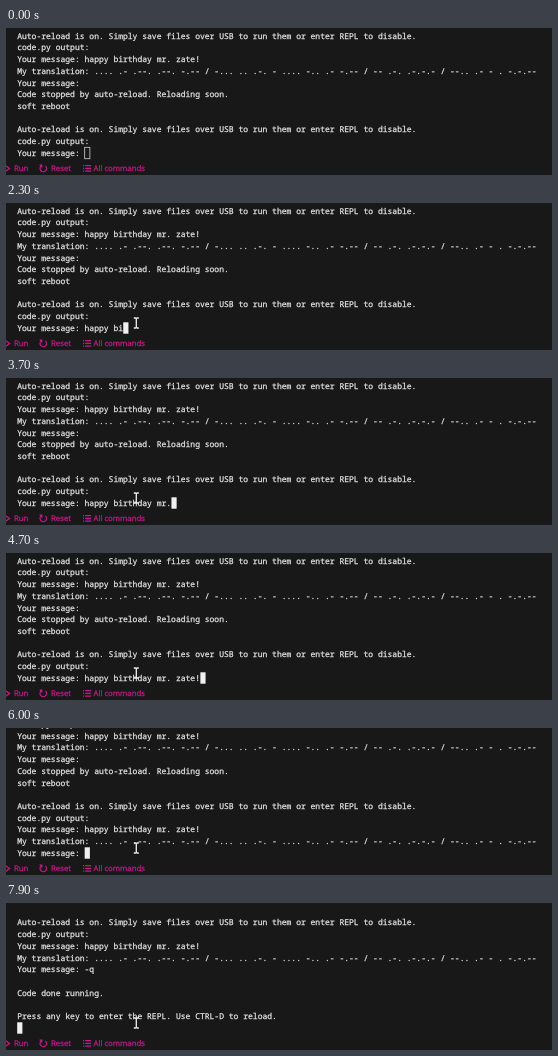
Recreate the animation shown at these times as an HTML page. Size 546x147 px, loop 8 s.

```html
<!DOCTYPE html>
<html lang="en">
<head>
<meta charset="utf-8">
<title>Morse terminal</title>
<style>
  html, body { margin: 0; width: 100%; height: 100%; overflow: hidden; background: #181818; }
  svg { display: block; width: 546px; height: 147px; }
  text { white-space: pre; text-rendering: geometricPrecision; stroke-width: 0.25; }
  .term text { font: 8.03px "Noto Sans Mono", "DejaVu Sans Mono", monospace; fill: #e6e6e6; stroke: #e6e6e6; }
  .bar text { font: 7.8px "Open Sans", "Noto Sans", sans-serif; fill: #c8188c; stroke: #c8188c; }
  .bar path { fill: none; stroke: #c8188c; stroke-width: 1.2; }
</style>
</head>
<body>
<svg viewBox="0 0 546 147">
  <g class="term" id="term"></g>
  <rect id="caret" width="5.2" height="11.4" y="119.3"/>
  <g class="bar">
    <path d="M-2 136.7 L3.6 140.5 L-2 144.3"/>
    <text x="8" y="143.2">Run</text>
    <path d="M35.2 137.9 A3.3 3.3 0 1 0 39.4 137.9 M33.6 137.1 H35.8 V139.5"/>
    <text x="45" y="143.2">Reset</text>
    <path d="M77 137.6 h1.2 m1 0 h6 M77 140.4 h1.2 m1 0 h6 M77 143.2 h1.2 m1 0 h6"/>
    <text x="87.5" y="143.2">All commands</text>
  </g>
  <path id="mouse" fill="none" stroke="#f0f0f0" stroke-width="1.3"
        d="M-2.5 -5 H-.8 L0 -4.3 L.8 -5 H2.5 M0 -4.3 V4.3 M-2.5 5 H-.8 L0 4.3 L.8 5 H2.5"/>
</svg>
<script>
// The first of the twelve rows is scrolled off except for its descenders
const LOOP = 8000, ROWS = 12, LEFT = 11.2, CHAR = 4.82, LINE = 11.72, BASE = -1;
const MORSE = {
  a: '.-', b: '-...', d: '-..', e: '.', h: '....', i: '..', m: '--', p: '.--.',
  r: '.-.', t: '-', y: '-.--', z: '--..', ' ': '/', '.': '.-.-.-', '!': '-.-.--'
};
const phrase = 'happy birthday mr. zate!';
const prompt = 'Your message: ';
const translation = 'My translation: ' + [...phrase].map(c => MORSE[c]).join(' ');
const startup = [
  'Auto-reload is on. Simply save files over USB to run them or enter REPL to disable.',
  'code.py output:'
];
const history = [
  '', ...startup, prompt + phrase, translation, prompt,
  'Code stopped by auto-reload. Reloading soon.', 'soft reboot', '', ...startup
];
const farewell = [
  '', 'Code done running.', '', 'Press any key to enter the REPL. Use CTRL-D to reload.', ''
];

// Key press times in ms
const phraseKeys = [
  1400, 1500, 1600, 1800, 1900, 2000, 2200, 2300, 2400, 2500, 2700, 2800,
  3000, 3200, 3200, 3400, 3500, 3700, 3900, 4100, 4300, 4400, 4500, 4600
];
const quitKeys = [7400, 7600];
const FOCUS = 700, SEND = 4800, QUIT = 7800;
const mousePath = [[100, 42, 139], [200, 82, 130], [300, 118, 122], [400, 130.3, 120]];

const typed = (text, keys, t) => text.slice(0, keys.filter(k => k <= t).length);

function screenLines(t) {
  const lines = [...history, prompt + typed(phrase, phraseKeys, t)];
  if (t >= SEND) lines.push(translation, prompt + typed('-q', quitKeys, t));
  if (t >= QUIT) lines.push(...farewell);
  return lines.slice(-ROWS);
}

const byId = id => document.getElementById(id);
const term = byId('term'), caret = byId('caret'), mouse = byId('mouse');
const rows = Array.from({ length: ROWS }, (_, i) => {
  const row = document.createElementNS('http://www.w3.org/2000/svg', 'text');
  row.setAttribute('x', LEFT);
  row.setAttribute('y', BASE + i * LINE);
  return term.appendChild(row);
});

function draw(t) {
  const lines = screenLines(t);
  rows.forEach((row, i) => {
    if (row.textContent !== lines[i]) row.textContent = lines[i];
  });

  const focused = t >= FOCUS;
  caret.setAttribute('x', LEFT + lines[ROWS - 1].length * CHAR);
  caret.setAttribute('fill', focused ? '#f0f0f0' : 'none');
  caret.setAttribute('stroke', focused ? 'none' : '#d0d0d0');
  caret.setAttribute('stroke-width', 0.8);

  const spot = mousePath.filter(p => p[0] <= t).pop();
  mouse.style.display = spot ? '' : 'none';
  if (spot) mouse.setAttribute('transform', `translate(${spot[1]} ${spot[2]})`);
}

function tick() {
  draw(performance.now() % LOOP);
  requestAnimationFrame(tick);
}
tick();
</script>
</body>
</html>
```
